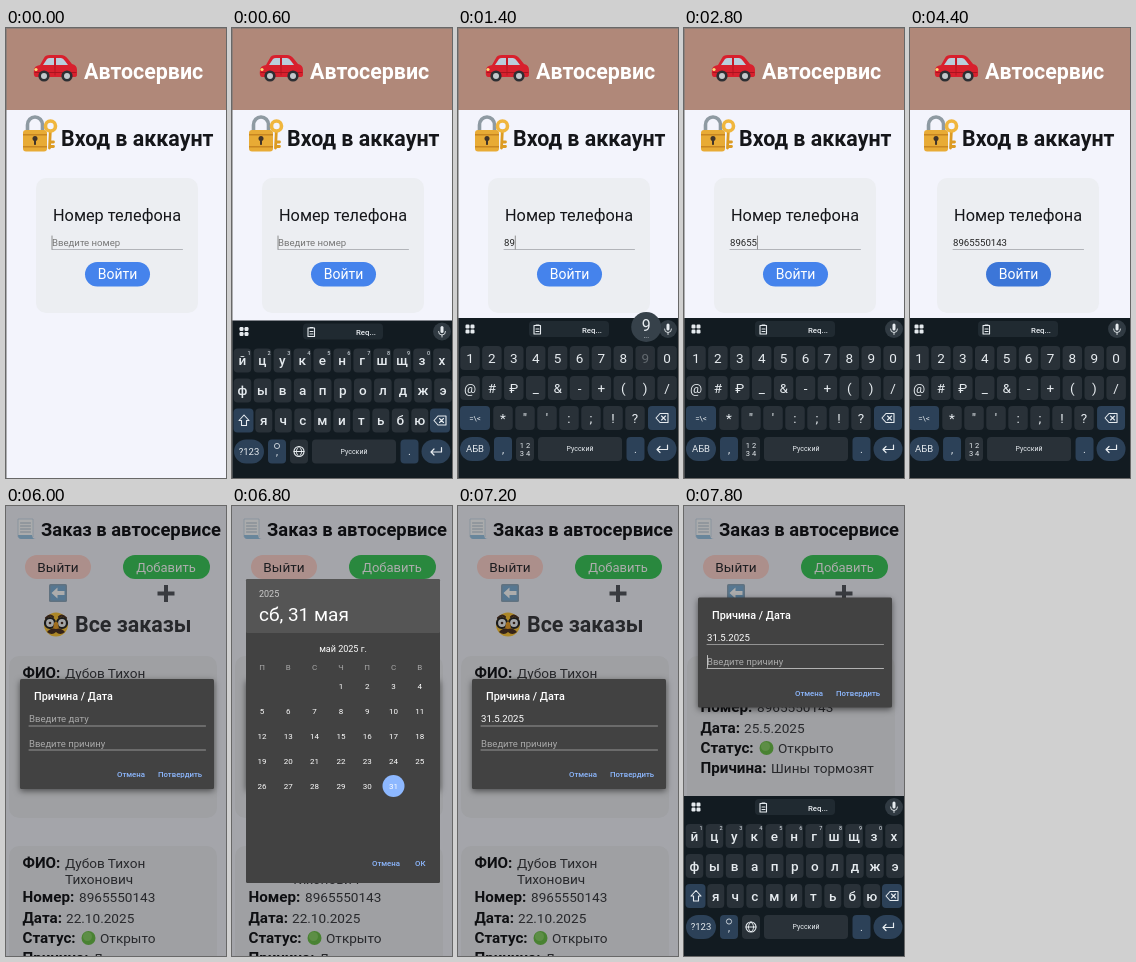
These frames come from a looping animation (220 by 450 pixels, 8000 ms). An HTML page:

```html
<!DOCTYPE html>
<html lang="ru">
<head>
<meta charset="utf-8">
<title>Автосервис</title>
<style>
html, body { margin: 0; width: 100%; height: 100%; overflow: hidden; background: #f3f4fc; }
svg { display: block; width: 100vw; height: 100vh; }
text { font-family: Roboto, "Noto Sans", sans-serif; white-space: pre; }
</style>
</head>
<body>
<svg id="stage" viewBox="0 0 220 450"></svg>
<script>
const LOOP = 8000, STEP = 200;
const PHONE = '8965550143', NAME = ['Дубов Тихон', 'Тихонович'];
const TYPED_AT = [1200, 1400, 1800, 2200, 2600, 3000, 3200, 3400, 3600, 3800];

// Drawing helpers
const rect = (x, y, w, h, r, fill, more = '') =>
  `<rect x="${x}" y="${y}" width="${w}" height="${h}" rx="${r}" fill="${fill}" ${more}/>`;
const circle = (x, y, r, fill, more = '') => `<circle cx="${x}" cy="${y}" r="${r}" fill="${fill}" ${more}/>`;
const path = (d, fill, more = '') => `<path d="${d}" fill="${fill}" ${more}/>`;
const line = (d, color, w = 1, more = '') =>
  path(d, 'none', `stroke="${color}" stroke-width="${w}" stroke-linecap="round" stroke-linejoin="round" ${more}`);
const text = (x, y, size, str, fill = '#15161a', more = '') =>
  `<text x="${x}" y="${y}" font-size="${size}" fill="${fill}" ${more}>${str}</text>`;
const bold = (x, y, size, str, fill = '#15161a') => text(x, y, size, str, fill, 'font-weight="700"');
const mid = (x, y, size, str, fill, more = '') => text(x, y, size, str, fill, 'text-anchor="middle" ' + more);
const group = (id, body) => `<g id="${id}">${body}</g>`;

// Emoji
const car =
  path('M28 42Q28 38 34 37L38 30Q39 27 44 27H55Q59 27 62 31L66 36Q71 37 71 42V47Q71 49 68 49H30Q27 49 28 42Z', '#d8202d') +
  path('M37 37L41 31Q42 30 44 30H48V37ZM50 30H55Q57 30 59 33L62 37H50Z', '#b9cfdc') +
  line('M29 44.5H70', '#a9141f', 1) + line('M49 30V47', '#a9141f', .7) + circle(30, 41.5, 1.6, '#ffd875') +
  [38, 61].map(x => circle(x, 48, 5.6, '#2d2f33') + circle(x, 48, 3, '#c3c8cc')).join('');

const lock =
  line('M21.5 104V97A7.5 8 0 0 1 36.5 97V104', '#8e9aa2', 3.6) +
  rect(17, 102, 24, 21.5, 3, '#e8ab35') + rect(17, 106, 24, 1.5, 0, '#c88621') + rect(17, 118, 24, 1.5, 0, '#c88621') +
  circle(29, 110.5, 2.5, '#40342a') + rect(28, 111, 2, 6, .8, '#40342a') +
  line('M44.3 104L43.5 120M44 114H47.5M43.8 118.5H47.5', '#dc9b22', 2.8) +
  circle(44.5, 98, 5, 'none', 'stroke="#f0b63d" stroke-width="3.6"');

const page =
  path('M12 13H27V31H12Z', '#fbfdff', 'stroke="#c3d6e6" stroke-width=".8"') +
  [17, 20, 23, 26].map(y => line(`M14.5 ${y}H24.5`, '#9fb4c6', .8)).join('') +
  path('M12 29H26Q26 33 30 33H15Q12 33 12 29Z', '#9cc6e6');

const back = rect(43, 78, 18, 18, 1.5, '#8fa9bd') + rect(44.5, 79.5, 15, 15, 1, '#7fb0d6') +
  path('M45.5 87L51.5 81.5V85H58.5V89H51.5V92.5Z', '#fff');
const plus = line('M160 79V96M151.5 87.5H168.5', '#54585e', 4, 'style="stroke-linecap:butt"');

const disguise =
  circle(50, 118.5, 12, '#ffc83a') +
  line('M40 112Q44 108 47 111M53 111Q56 108 60 112', '#4b3225', 2.2) +
  [44, 56].map(x => circle(x, 117, 5, '#f2f5f7', 'stroke="#26282b" stroke-width="2.2"') + circle(x, 117, 1.3, '#4b3225')).join('') +
  path('M48 117Q50 114 52 117L53 123H47Z', '#eda32d') +
  path('M50 123Q45 121 41 126Q46 130 50 126Q54 130 59 126Q55 121 50 123Z', '#4b3225');

// Screens
const login =
  rect(-30, 0, 280, 450, 0, '#f3f4fc') + rect(-30, 0, 280, 82, 0, '#b08879') +
  car + bold(78, 50.5, 21.4, 'Автосервис', '#fff') +
  lock + bold(55, 118, 21.4, 'Вход в аккаунт') +
  rect(30, 150, 162, 135, 10, '#eceef2') + text(47, 193, 16.3, 'Номер телефона') +
  text(46, 217.5, 9.6, '', '#222', 'id="phone"') + line('M46 221.5H176.5', '#a4a6ab', .8) +
  line('M0 208V221', '#777', .8, 'id="caret"') +
  rect(79, 234, 65, 24.5, 12.25, '#4583ec', 'id="enter"') + mid(111.5, 251, 14, 'Войти', '#fff');

const order = (top, date, reason) => {
  const value = (x, y, str) => text(x, top + y, 13.6, str, '#3a3b40');
  const row = (y, key, x, str) => bold(16.5, top + y, 15.2, key) + value(x, y, str);
  return rect(3, top, 208, 162, 10, '#ebedf1') +
    row(22, 'ФИО:', 59, NAME[0]) + value(59, 38, NAME[1]) +
    row(56, 'Номер:', 73, PHONE) + row(77, 'Дата:', 60, date) +
    row(97, 'Статус:', 94, 'Открыто') + circle(82.5, top + 92, 7, '#6cc04a') +
    circle(81.5, top + 90.5, 4.5, '#8ad267') + row(117, 'Причина:', 87, reason);
};

const orders =
  rect(0, 0, 250, 450, 0, '#f3f4fc') + page + bold(35, 30, 18.35, 'Заказ в автосервисе') +
  rect(19, 49, 66, 24, 12, '#ffd3cd') + mid(52, 66, 13.6, 'Выйти', '#2a2b30') +
  rect(117, 49, 87, 24, 12, '#3cc95c') + mid(160, 65.5, 13, 'Добавить', '#fff') +
  back + plus + disguise + bold(69, 126, 21.4, 'Все заказы', '#3a3b40') +
  order(150, '25.5.2025', 'Шины тормозят') + order(340, '22.10.2025', 'Двигатель');

const BLUE = '#8db8ff', HINT = '#a9a9a9';
const action = (x, y, str) => text(x, y, 7.8, str, BLUE, 'font-weight="500"');
const dialog =
  rect(14, 173, 194, 110, 1.5, '#424242', 'style="filter:drop-shadow(0 2px 3px #0008)"') +
  text(28, 194, 10.8, 'Причина / Дата', '#fff', 'font-weight="500"') +
  text(23, 216, 9.6, '', '#fff', 'id="date"') + line('M23 220H199.5', HINT, .8) +
  text(23, 240.5, 9.5, 'Введите причину', HINT) + line('M23 244H199.5', HINT, .8, 'id="reasonLine"') +
  line('M23.5 231V243', '#ddd', .8, 'id="reasonCaret"') +
  action(111, 271, 'Отмена') + action(152, 271, 'Потвердить');

const dayPos = day => [30 + (day + 2) % 7 * 26.3, 180 + Math.floor((day + 2) / 7) * 25];
const picker =
  rect(14, 73, 194, 304, 1.5, '#424242') + rect(14, 73, 194, 54, 1.5, '#555') +
  text(27, 91, 9, '2025', '#ccc') + text(27, 115, 19, '', '#fff', 'id="pickedDay"') +
  mid(111, 146, 9, 'май 2025 г.', '#fff') + circle(0, 0, 11, BLUE, 'id="picked"') +
  [...'ПВСЧПСВ'].map((c, i) => mid(30 + i * 26.3, 164, 8, c, HINT)).join('') +
  Array.from({ length: 31 }, (_, i) => {
    const [x, y] = dayPos(i + 1);
    return mid(x, y + 3, 8, i + 1, '#fff');
  }).join('') + action(140, 360, 'Отмена') + action(183, 360, 'ОК');

// Keyboards
const INK = '#e6ebef', KEY = '#293138', SIDE = '#2c4158';
const key = (x, y, w, label, size = 13, fill = KEY, r = 4) =>
  rect(x - w / 2, y - 12, w, 24, r, fill) + mid(x, y + size * .35, size, label, INK);
const symX = i => 12 + i * 21.9;
const rowOf = (chars, x, step, y, w, size) =>
  [...chars].map((c, i) => key(x + i * step, y, w, c, size)).join('');

const bar =
  rect(-10, 290, 240, 160, 0, '#121b21') +
  [9.5, 14.5].map(x => [298.5, 303.5].map(y => rect(x - 2, y - 2, 4, 4, 1.2, INK)).join('')).join('') +
  rect(71, 293, 80, 16, 4, '#202a31') +
  line('M76 297.5H82.5V306H76ZM78 297H81M78 301H81M78 303.5H81', INK, 1.1) +
  text(124, 304.5, 7.8, 'Req...', INK, 'font-weight="500"') +
  circle(210, 301, 9, '#303a42') + rect(208.5, 295.5, 3, 7, 1.5, INK) +
  line('M206.5 301A3.5 3.5 0 0 0 213.5 301M210 304.5V306.5', INK, .9);

const backspace = (x, w) => key(x, 390, w, '', 1, SIDE) +
  line(`M${x - 6} 390l4 -4.5h8v9h-8zM${x - .5} 388l4 4m0 -4l-4 4`, INK, 1.1);
const bottom = mode =>
  key(17, 421, 30, mode, 9.5, SIDE, 12) + key(122, 421, 84, 'Русский', 7) +
  key(177.5, 421, 18, '.', 11, SIDE) + key(204, 421, 29, '', 1, SIDE, 12) +
  line('M209.5 417V421.5H199M202 418.5L199 421.5L202 424.5', INK, 1.2);

const symbols = bar +
  rowOf('1234567890', 12, 21.9, 330, 19.5, 13.5) + rowOf('@#₽_&-+()/', 12, 21.9, 360, 19.5, 13.5) +
  key(17, 390, 30, '=\\&lt;', 8, SIDE) + rowOf('*"\':;!?', 45, 22, 390, 19.5, 13.5) + backspace(204, 28) +
  bottom('АБВ') + key(45, 421, 18, ',', 11, SIDE) + key(67, 421, 18, '') +
  mid(67, 419.5, 7.5, '1 2', INK) + mid(67, 427.5, 7.5, '3 4', INK);

const letters = bar + '<g font-weight="500">' +
  rowOf('йцукенгшщзх', 10.5, 19.95, 330, 17.6, 13.5) + rowOf('фывапролджэ', 10.5, 20.05, 360, 17.6, 13.5) +
  [...'1234567890'].map((c, i) => mid(17 + i * 19.95, 324, 5.5, c, '#c3cad0')).join('') +
  rowOf('ячсмитьбю', 31.8, 19.5, 390, 17, 13.5) + '</g>' +
  key(11.5, 390, 20, '', 1, SIDE) + line('M12 384.5L17 390H14.5V395H9.5V390H7Z', INK, 1.1) + backspace(208, 20) +
  bottom('?123') + key(45, 421, 18, ',', 10, SIDE) + circle(45, 415.5, 2.6, 'none', `stroke="${INK}" stroke-width=".8"`) +
  key(67, 421, 18, '') + circle(67, 421, 5, 'none', `stroke="${INK}" stroke-width="1.1"`) +
  line('M62 421H72M67 416C63.5 419 63.5 423 67 426C70.5 423 70.5 419 67 416', INK, 1);

const popup = circle(0, 0, 15, '#36414a') + mid(0, 4, 16, '', INK, 'id="popDigit"') + mid(0, 11, 7, '...', INK);

const stage = document.getElementById('stage');
stage.innerHTML =
  group('login', login) + group('orders', orders) + rect(0, 0, 220, 450, 0, '#000', 'id="dim"') +
  group('dialog', dialog) + group('picker', picker) + group('letters', letters) +
  group('symbols', symbols + rect(0, 319, 17, 22, 4, KEY, 'id="pressed" opacity=".7"')) + group('popup', popup) +
  path('M0 0H220V1H1V450H0Z', '#777', 'id="edge" opacity=".55"');

const el = {};
stage.querySelectorAll('[id]').forEach(node => el[node.id] = node);

const ramp = (t, a, b) => Math.min(1, Math.max(0, (t - a) / (b - a)));
const ease = k => 1 - (1 - k) ** 3;
const show = (node, on) => node.style.display = on ? '' : 'none';
const move = (node, x, y) => node.setAttribute('transform', `translate(${x} ${y})`);
const put = (node, str) => { if (node.textContent !== str) node.textContent = str; };

function draw(t) {
  // Login form and typing
  const count = TYPED_AT.filter(at => t >= at).length;
  const leave = ramp(t, 4300, 4800), slide = -24 * leave ** 1.3;
  put(el.phone, count ? PHONE.slice(0, count) : 'Введите номер');
  el.phone.setAttribute('fill', count ? '#222' : '#777');
  move(el.caret, 46 + (count ? el.phone.getComputedTextLength() + .5 : 0), 0);
  show(el.caret, t < 4200);
  show(el.edge, !leave);
  el.enter.setAttribute('fill', t >= 4200 ? '#3c76d8' : '#4583ec');
  move(el.login, slide, 0);

  // Orders list
  const enter = ramp(t, 4400, 4800);
  show(el.orders, enter > 0);
  el.orders.setAttribute('opacity', enter);
  move(el.orders, 22 * (1 - ease(enter)), 0);

  // Dialog and date picker
  const open = ramp(t, 5300, 5600), lift = ease(ramp(t, 7300, 7700));
  el.dim.setAttribute('opacity', .325 * open);
  el.dialog.setAttribute('opacity', open);
  move(el.dialog, 0, -81.5 * lift);
  const dated = t >= 7000, focus = t >= 7400;
  put(el.date, dated ? '31.5.2025' : 'Введите дату');
  el.date.setAttribute('fill', dated ? '#fff' : HINT);
  el.reasonLine.setAttribute('stroke', focus ? '#d0d0d0' : HINT);
  show(el.reasonCaret, focus);
  const day = t < 6800 ? 25 : 31;
  show(el.picker, t >= 6400 && !dated);
  put(el.pickedDay, day === 25 ? 'вс, 25 мая' : 'сб, 31 мая');
  move(el.picked, ...dayPos(day));

  // Keyboards
  const rise = t < 5000 ? ease(ramp(t, 300, 700)) : lift;
  show(el.letters, t < 1000 || t > 5000);
  move(el.letters, 0, 160 * (1 - rise));
  show(el.symbols, t >= 1000 && t < 4800);
  move(el.symbols, slide, 160 * ramp(t, 4400, 4800));
  const hit = TYPED_AT.indexOf(t);
  show(el.popup, hit >= 0);
  show(el.pressed, hit >= 0);
  if (hit >= 0) {
    const x = symX((+PHONE[hit] + 9) % 10);
    move(el.popup, x + 1, 299);
    el.pressed.setAttribute('x', x - 8.5);
    put(el.popDigit, PHONE[hit]);
  }
}

const start = performance.now();
function tick(now) {
  const t = Math.max(0, now - start) % LOOP;
  draw(Math.floor(t / STEP) * STEP);
  requestAnimationFrame(tick);
}
draw(0);
requestAnimationFrame(tick);
</script>
</body>
</html>
```
